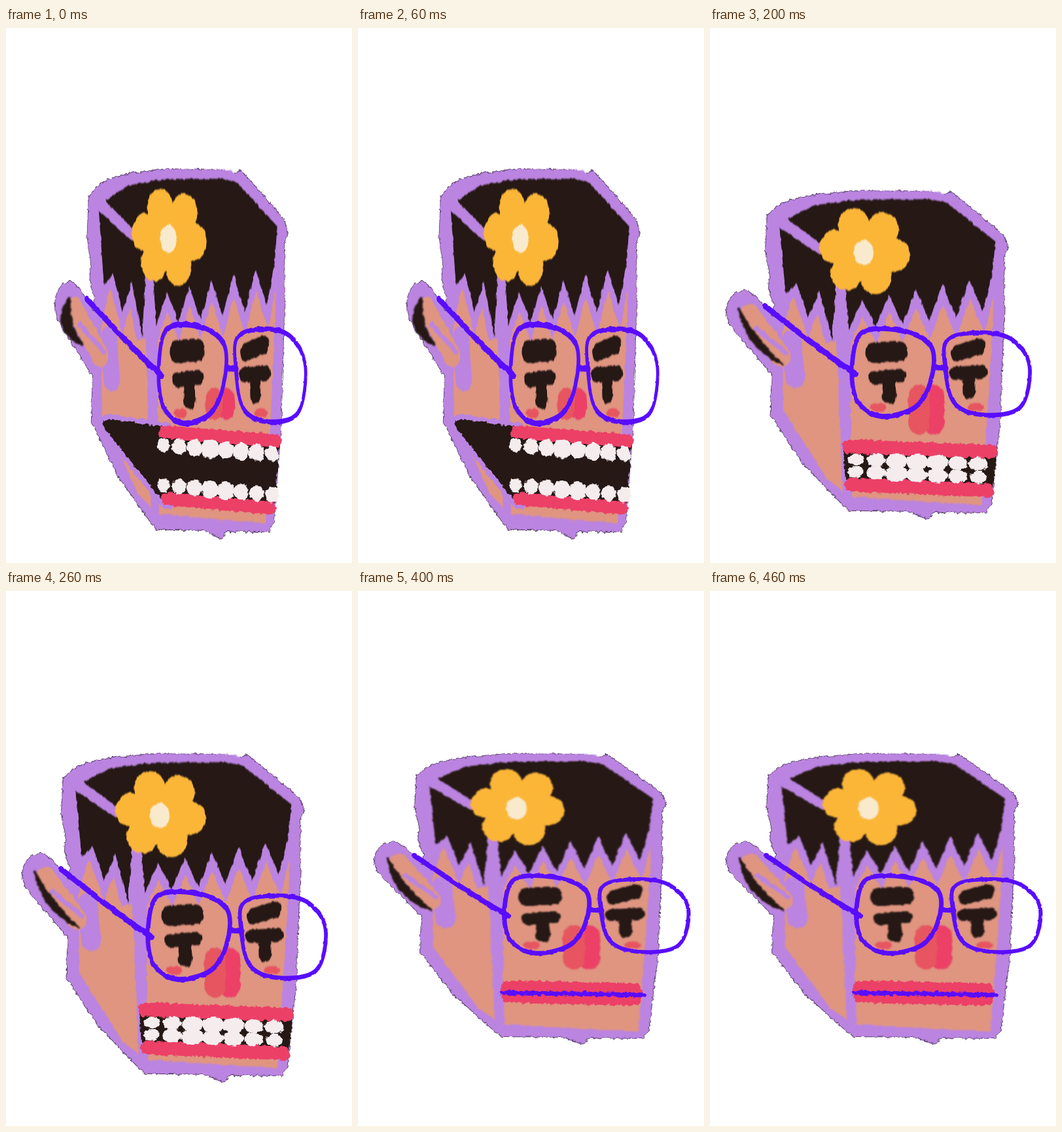
An HTML page for the animation above (0.5 s loop, 529 px wide and 817 px high).

```html
<!DOCTYPE html>
<html lang="en">
<head>
<meta charset="utf-8">
<title>Chattering head</title>
<style>
html, body { margin: 0; width: 100%; height: 100%; overflow: hidden; background: #fff; }
svg { display: block; width: 529px; height: 817px; }
</style>
</head>
<body>
<svg id="stage" viewBox="0 0 529 817"></svg>
<script>
const C = {
  purple: '#bb84e1', edge: '#5d4470', skin: '#df9580', black: '#251815', yellow: '#fbb638',
  cream: '#faeacd', blue: '#590dff', pink: '#ec4067', red: '#e65560', white: '#f5ecee'
};

const range = n => [...Array(n).keys()];
const lerp = (a, b, t) => a + (b - a) * t;

function random(seed) {
  return () => {
    seed = (seed * 16807) % 2147483647;
    return seed / 2147483647;
  };
}

const poly = (points, fill, extra = '') => `<polygon points="${points}" fill="${fill}" ${extra}/>`;
const stroke = (d, w, color) =>
  `<path d="${d}" fill="none" stroke="${color}" stroke-width="${w}" stroke-linecap="round" stroke-linejoin="round"/>`;
const line = (points, w, color) => stroke('M' + points, w, color);
const oval = (x, y, rx, ry, fill) => `<ellipse cx="${x}" cy="${y}" rx="${rx}" ry="${ry}" fill="${fill}"/>`;
const group = (body, filter) => `<g filter="url(#${filter})">${body}</g>`;

// Closed Catmull-Rom curve through a few points
function loop(points) {
  const p = points.split(' ').map(s => s.split(',').map(Number)), n = p.length;
  const at = i => p[(i + n) % n];
  const handle = (i, sign) => at(i).map((v, k) => v + sign * (at(i + 1)[k] - at(i - 1)[k]) / 6);
  return 'M' + p[0] + range(n).map(i => `C${handle(i, 1)} ${handle(i + 1, -1)} ${at(i + 1)}`).join('') + 'Z';
}

// Opaque noise keeps the displacement centred on zero
const rough = (id, freq, scale, blur) => `
  <filter id="${id}" filterUnits="userSpaceOnUse" x="0" y="0" width="529" height="817" color-interpolation-filters="sRGB">
    <feTurbulence type="fractalNoise" baseFrequency="${freq}" numOctaves="2" seed="4"/>
    <feComponentTransfer result="noise"><feFuncA type="linear" slope="0" intercept="1"/></feComponentTransfer>
    <feDisplacementMap in="SourceGraphic" in2="noise" scale="${scale}" xChannelSelector="R" yChannelSelector="G"/>
    <feGaussianBlur stdDeviation="${blur}"/>
  </filter>`;

// Alternating peaks and tips of a fringe, left to right
const spikes = (n, tip, peak, dx, tipDy, peakDy) => range(n).flatMap(i => [
  [tip[0] + dx * i, tip[1] + tipDy * i],
  [peak[0] + dx * i, peak[1] + peakDy * i]
]);

const outline = `90,282 104,271 126,261 170,254 225,249 340,250 372,254 381,250 425,281 462,308 471,322 464,338
  465,400 458,560 444,670 436,683 353,682 345,691 310,681 218,680 145,615 95,551 97,500 100,400 92,380 94,360 87,330`;
const shell = (color, grow) =>
  poly(outline, color, `stroke="${color}" stroke-width="${grow}"`) + line('53,412 118,478', 56 + grow, color);

const skin =
  poly('114,440 130,390 196,410 206,560 210,655 185,638 115,545', C.skin) +
  poly('222,400 449,385 442,500 429,673 222,662', C.skin) +
  line('128,452 134,500', 31, C.purple) +
  line('62,416 112,472', 30, C.skin) +
  line('72,434 120,468', 7, C.purple);

function hair() {
  const fringe = [...spikes(5, [219, 436], [240, 396], 42.4, -4, -7), [431, 411]].reverse();
  const side = [...spikes(2, [119, 388], [136, 374], 36, 31, 9), [192, 450]].reverse();
  const locks = [
    `122,286 165,268 240,260 350,260 375,265 451,317 446,360 ${fringe.join(' ')} 214,385 214,345`,
    `109,298 160,327 197,345 198,385 ${side.join(' ')}`
  ];
  const edge = `stroke="${C.purple}" stroke-width="22" stroke-miterlimit="5"`;
  return line('207,400 210,530 217,665', 15, C.purple) +
    locks.map(l => poly(l, C.purple, edge)).join('') +
    locks.map(l => poly(l, C.black)).join('');
}

function flower(x, y) {
  const petals = range(6).map(i => {
    const a = (i * 60 + 8) * Math.PI / 180;
    return oval(x + 47 * Math.cos(a), y + 38 * Math.sin(a), 25, 23, C.yellow);
  });
  return petals.join('') + oval(x, y, 40, 34, C.yellow) + oval(x - 2, y + 2, 16, 17, C.cream);
}

const glasses =
  stroke(loop('240,440 300,437 348,457 350,500 325,540 270,553 232,532 224,485'), 7, C.blue) +
  stroke(loop('376,449 430,440 478,450 505,486 490,541 430,551 385,534 371,485'), 6, C.blue) +
  line('353,487 372,488', 7, C.blue) +
  line('86,404 150,447 200,479 230,496', 8, C.blue);

const defs = `<defs>${rough('edge', 0.16, 6, 0.2)}${rough('chalk', 0.12, 5, 0.8)}
  ${rough('ink', 0.1, 3, 0.4)}${rough('grit', 0.16, 7, 0.3)}
  <g id="head">${group(shell(C.edge, 2) + shell(C.purple, 0), 'edge')}
  ${group(skin + hair() + flower(244, 330), 'chalk')}</g>
  <g id="glasses">${group(glasses, 'ink')}</g></defs>`;

function face({ pupil = 22, cheek = 541, nose = 561 }) {
  const dark = (points, w) => line(points, w, C.black);
  return line(`353,527 353,${nose}`, 34, C.pink) + line(`330,527 330,${nose}`, 34, C.red) +
    dark('259,467 298,465', 28) + dark('259,501 300,498', 18) + dark(`282,505 283,${537 - pupil / 2}`, pupil) +
    dark('391,468 424,459', 22) + dark('387,495 429,493', 18) + dark(`409,500 409,${531 - pupil / 2}`, pupil * 0.9) +
    oval(265, cheek, 13, 6, C.red) + oval(420, cheek, 13, 6, C.red);
}

// Dark sliver inside the ear, between two points
function sliver([x0, y0, x1, y1], bulge) {
  const len = Math.hypot(x1 - x0, y1 - y0);
  const ctrl = b => [(x0 + x1) / 2 - b * (y1 - y0) / len, (y0 + y1) / 2 + b * (x1 - x0) / len];
  return `<path d="M${x0},${y0}Q${ctrl(bulge / 3)} ${x1},${y1}Q${ctrl(bulge)} ${x0},${y0}Z"
    fill="${C.black}" stroke="${C.black}" stroke-width="3"/>`;
}

// A row of uneven teeth hanging off a lip; dir is 1 below it, -1 above
function teeth([x0, y0, x1, y1], dir, { n, from, to, height }, lip) {
  const rnd = random(77 + n * dir), gap = (to - from) / (n - 1);
  return range(n).map(i => {
    const x = from + gap * i;
    const size = 0.75 + 0.25 * Math.sin(Math.PI * (i + 0.7) / n) + (rnd() - 0.5) * 0.15;
    const y = lerp(y0, y1, (x - x0) / (x1 - x0)) + dir * (lip / 2 + height * 0.75);
    return oval(x, y, gap * 0.54 * size, height * size, C.white);
  }).join('');
}

function mouth({ upper, lower, lip, corner, closed, bite, seam }) {
  const [a, b] = [upper.slice(0, 2), upper.slice(2)], [c, d] = [lower.slice(0, 2), lower.slice(2)];
  const rim = lip - 4;
  const jaw = corner ? line([a, corner, c].join(' '), rim + 14, C.purple) : '';
  const cavity = poly([a, b, d, c, corner || c].join(' '), C.black,
    `stroke="${C.black}" stroke-width="${rim}" stroke-linejoin="round"`);
  const lips = stroke(closed ? `M${a}L${b}L${d}L${c}Z` : `M${a}L${b}M${c}L${d}`, lip, C.pink);
  return jaw + (seam ? '' : cavity) + lips +
    (bite ? teeth(upper, 1, bite, lip) : '') +
    (bite && !closed ? teeth(lower, -1, bite, lip) : '') +
    (seam ? line('220,614 330,615 438,617', 7, C.blue) : '');
}

// at and scale stretch the head; ear and mouth are in stage units
const poses = [
  { at: [74, 215], scale: [0.798, 1.274], nose: 532, ear: [98, 411, 118, 485], bulge: 46,
    upper: [243, 617, 411, 630], lower: [247, 719, 402, 733], lip: 20, corner: [156, 605],
    bite: { n: 8, from: 241, to: 407, height: 14 } },
  { at: [74, 211], scale: [0.886, 1.256], nose: 532, ear: [88, 409, 156, 506], bulge: 24,
    upper: [250, 607, 454, 624], lower: [251, 700, 447, 711], lip: 22, corner: [150, 581],
    bite: { n: 8, from: 243, to: 438, height: 15 } },
  { at: [24, 248], scale: [0.966, 1.131], ear: [43, 427, 112, 515], bulge: 28,
    upper: [212, 639, 430, 647], lower: [216, 697, 424, 706], lip: 21,
    bite: { n: 7, from: 223, to: 410, height: 12 } },
  { at: [24, 248], scale: [1, 1.068], ear: [44, 419, 114, 502], bulge: 32, pupil: 32, cheek: 569,
    upper: [217, 613, 446, 623], lower: [217, 654, 440, 666], lip: 21, closed: true,
    bite: { n: 8, from: 225, to: 431, height: 17 } },
  { at: [24, 248], scale: [1, 1], ear: [45, 407, 113, 488], bulge: 32,
    upper: [231, 607, 422, 611], lower: [231, 617, 422, 621], lip: 24, closed: true, seam: true }
];

function draw(pose) {
  return `<g class="pose">
    <g transform="translate(${pose.at}) scale(${pose.scale}) translate(-24 -248)">
      <use href="#head"/>${group(face(pose), 'chalk')}<use href="#glasses"/>
    </g>
    ${group(sliver(pose.ear, pose.bulge), 'chalk')}${group(mouth(pose), 'grit')}
  </g>`;
}

const stage = document.getElementById('stage');
stage.innerHTML = defs + poses.map(draw).join('');

// Each pose holds for one fifth of the loop
stage.querySelectorAll('.pose').forEach((el, i) => {
  const visibility = range(poses.length + 1).map(j => j === i ? 'visible' : 'hidden');
  el.animate({ visibility, easing: 'step-end' }, { duration: 500, iterations: Infinity });
});
</script>
</body>
</html>
```
